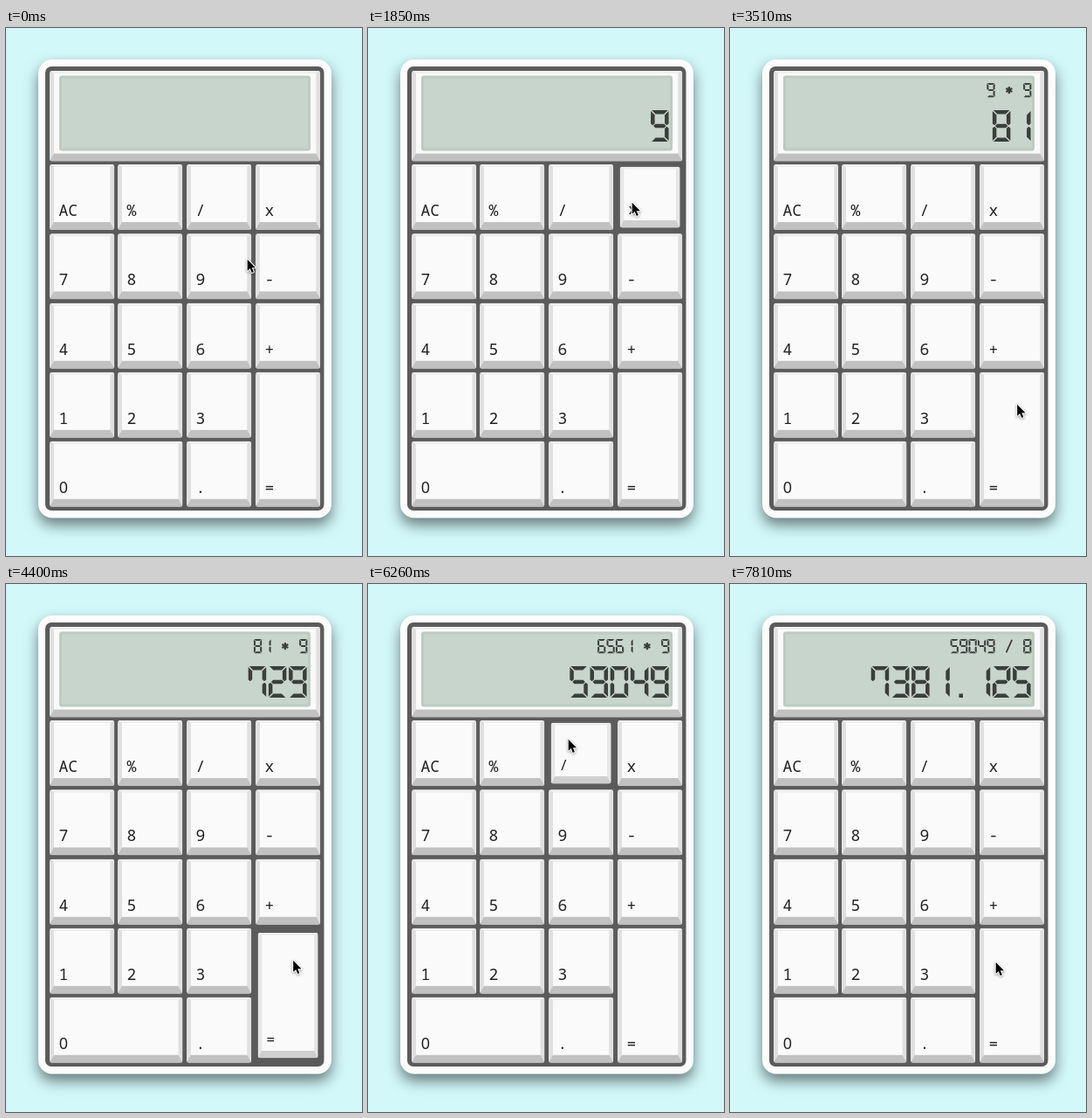
Animation, 408 px wide and 604 px high, one loop 8 s. Source, as an HTML page with a canvas:

```html
<!DOCTYPE html>
<html lang="en">
<head>
<meta charset="utf-8">
<title>Calculator</title>
<style>
  html, body { margin: 0; width: 100%; height: 100%; overflow: hidden; background: #d2f8fa; }
  canvas { display: block; width: 408px; height: 604px; }
</style>
</head>
<body>
<canvas id="stage"></canvas>
<script>
const W = 408, H = 604, LOOP = 8000;
const canvas = document.getElementById('stage');
const ctx = canvas.getContext('2d');
const dpr = window.devicePixelRatio || 1;
canvas.width = W * dpr;
canvas.height = H * dpr;

// Key grid
const COLS = [50, 128, 207, 286], ROWS = [156, 235.3, 314.7, 393.7, 472.7];
const KEY_W = 74.3, KEY_H = 75;
const keys = [];
['AC % / x', '7 8 9 -', '4 5 6 +', '1 2 3 ='].forEach((row, r) =>
  row.split(' ').forEach((label, c) =>
    keys.push({ label, x: COLS[c], y: ROWS[r], w: KEY_W, h: label === '=' ? 154 : KEY_H })));
keys.push({ label: '0', x: COLS[0], y: ROWS[4], w: 152.5, h: KEY_H });
keys.push({ label: '.', x: COLS[2], y: ROWS[4], w: KEY_W, h: KEY_H });

// Key presses: label, down, up
const presses = [
  ['9', 890, 1060], ['x', 1850, 2020], ['=', 2980, 3070], ['=', 3870, 3950],
  ['=', 4400, 4580], ['=', 5020, 5110], ['/', 6170, 6340], ['8', 6870, 7040],
  ['=', 7635, 7810]
];

// Display contents: time, expression, value
const readings = [
  [0, '', ''], [1240, '', '9'], [2020, '9 *', '9'], [3070, '9 * 9', '81'],
  [3950, '81 * 9', '729'], [4580, '729 * 9', '6561'], [5110, '6561 * 9', '59049'],
  [6340, '59049 /', '59049'], [7040, '59049 /', '8'], [7810, '59049 / 8', '7381.125']
];

// Pointer moves: first step, last step, number of steps, end point, bend point
const START = [276, 264];
const moves = [
  { t0: 270, t1: 440, n: 3, to: [261, 265], via: [268, 264] },
  { t0: 1240, t1: 1670, n: 6, to: [302, 199], via: [278, 225] },
  { t0: 2020, t1: 2370, n: 5, to: [239, 276], via: [272, 240] },
  { t0: 2550, t1: 2890, n: 5, to: [332, 429.5], via: [285, 370] },
  { t0: 3420, t1: 3510, n: 2, to: [328.5, 430], via: [330, 430] },
  { t0: 5290, t1: 5810, n: 7, to: [229, 177], via: [300, 220] },
  { t0: 6430, t1: 6610, n: 3, to: [150, 310], via: [185, 270] },
  { t0: 6690, t1: 6870, n: 3, to: [141, 282], via: [142, 300] },
  { t0: 7125, t1: 7470, n: 5, to: [304, 432], via: [225, 375] }
];

function pointerAt(t) {
  let from = START;
  for (const m of moves) {
    if (t < m.t0) break;
    const step = Math.min(m.n, 1 + Math.floor((t - m.t0 + 2) / ((m.t1 - m.t0) / (m.n - 1))));
    const e = 1 - (1 - step / m.n) ** 2, u = 1 - e;
    if (step < m.n) {
      return from.map((a, i) => u * u * a + 2 * u * e * m.via[i] + e * e * m.to[i]);
    }
    from = m.to;
  }
  return from;
}

function poly(points, color) {
  ctx.beginPath();
  points.forEach(([x, y]) => ctx.lineTo(x, y));
  ctx.closePath();
  ctx.fillStyle = color;
  ctx.fill();
}

function box(x, y, w, h, r, color) {
  ctx.beginPath();
  ctx.roundRect(x, y, w, h, r);
  ctx.fillStyle = color;
  ctx.fill();
}

function bevel(x, y, w, h, side, bottom) {
  const r = x + w, b = y + h, s = 5, top = 3, foot = 9;
  ctx.save();
  ctx.beginPath();
  ctx.roundRect(x, y, w, h, 3);
  ctx.clip();
  ctx.fillStyle = side;
  ctx.fillRect(x, y, w, h);
  poly([[x, y], [r, y], [r - s, y + top], [x + s, y + top]], '#efefef');
  poly([[x, b], [r, b], [r - s, b - foot], [x + s, b - foot]], bottom);
  ctx.fillStyle = '#fafafa';
  ctx.fillRect(x + s, y + top, w - 2 * s, h - top - foot);
  ctx.restore();
}

function drawKey({ label, x, y, w, h }, down) {
  ctx.save();
  if (down) {
    const cx = x + w / 2, cy = y + h / 2;
    ctx.translate(cx, cy);
    ctx.scale(0.93, 0.93);
    ctx.translate(-cx, -cy);
  }
  bevel(x, y, w, h, down ? '#e6e6e6' : '#e0e0e0', down ? '#cfcfcf' : '#c1c1c1');
  ctx.fillStyle = '#222';
  const plainZero = label === '0';
  ctx.font = plainZero ? '18px "Noto Sans", sans-serif' : '18px "Noto Sans Mono", monospace';
  ctx.fillText(label, x + (plainZero ? 10.8 : 10.5), y + h - 16.2);
  ctx.restore();
}

// Seven-segment glyphs, in units of the large digits
const GW = 20.5, GH = 36, CELL = 23.2, T = 4.5, MID = GH / 2;
const INK = '#3a3f3b';
const flipX = p => p.map(([x, y]) => [GW - x, y]);
const flipY = p => p.map(([x, y]) => [x, GH - y]);
const bar = [[1, 0], [GW - 1, 0], [GW - 1 - T, T], [1 + T, T]];
const post = [[0, 1], [T, 1 + T], [T, MID - 3], [T / 2, MID - 0.7], [0, MID - 2.5]];
const segments = {
  a: bar, d: flipY(bar),
  f: post, b: flipX(post), e: flipY(post), c: flipX(flipY(post)),
  g: [[3, MID], [5.2, MID - 2.2], [GW - 5.2, MID - 2.2],
      [GW - 3, MID], [GW - 5.2, MID + 2.2], [5.2, MID + 2.2]]
};
const digits = ['abcdef', 'bc', 'abged', 'abgcd', 'fgbc', 'afgcd', 'afgecd', 'fabc', 'abcdefg', 'abcdfg'];

function line(x1, y1, x2, y2, width) {
  ctx.beginPath();
  ctx.moveTo(x1, y1);
  ctx.lineTo(x2, y2);
  ctx.lineWidth = width;
  ctx.strokeStyle = INK;
  ctx.stroke();
}

function drawGlyph(ch) {
  if (ch === '.') {
    box(GW / 2 - 2.3, GH - T, T, T, 0, INK);
  } else if (ch === '/') {
    line(3, GH - 2, GW - 3, 2, 4);
  } else if (ch === '*') {
    for (let i = 0; i < 3; i++) {
      const a = Math.PI * (i / 3 + 0.5), dx = 9 * Math.cos(a), dy = 9 * Math.sin(a);
      line(GW / 2 - dx, MID - dy, GW / 2 + dx, MID + dy, 5);
    }
  } else if (ch !== ' ') {
    for (const s of digits[ch]) poly(segments[s], INK);
  }
}

function drawReadout(text, y, scale) {
  [...text].forEach((ch, i) => {
    ctx.save();
    ctx.translate(346 - (text.length - i) * CELL * scale, y);
    ctx.scale(scale, scale);
    ctx.translate(1.3, 0);
    drawGlyph(ch);
    ctx.restore();
  });
}

function drawCase() {
  ctx.fillStyle = '#d2f8fa';
  ctx.fillRect(0, 0, W, H);
  ctx.save();
  ctx.shadowColor = 'rgba(0,0,0,0.5)';
  ctx.shadowBlur = 16 * dpr;
  ctx.shadowOffsetY = 8 * dpr;
  box(37, 36, 336, 524.5, 16, '#fcfcfc');
  ctx.restore();
  box(45, 44, 319.5, 508, 7, '#5b5b5b');
  bevel(50, 49, 310.3, 103.5, '#e0e0e0', '#c1c1c1');
  box(61, 54.5, 288, 86, 3, '#bdcbc1');
  box(64, 57.5, 282, 80, 1, '#c8d5cc');
}

function drawPointer([x, y]) {
  ctx.save();
  ctx.translate(x + 0.7, y + 0.7);
  ctx.beginPath();
  [[0, 0], [0, 13], [3, 10.3], [5.1, 15.2], [7.2, 14.3], [5.1, 9.5], [9.3, 9.5]]
    .forEach(([px, py]) => ctx.lineTo(px, py));
  ctx.closePath();
  ctx.lineJoin = 'round';
  ctx.lineWidth = 2;
  ctx.strokeStyle = '#fff';
  ctx.shadowColor = 'rgba(0,0,0,0.4)';
  ctx.shadowBlur = 3 * dpr;
  ctx.shadowOffsetY = dpr;
  ctx.stroke();
  ctx.shadowColor = 'transparent';
  ctx.fillStyle = '#000';
  ctx.fill();
  ctx.restore();
}

function draw(t) {
  ctx.setTransform(dpr, 0, 0, dpr, 0, 0);
  drawCase();
  for (const key of keys) {
    drawKey(key, presses.some(([label, down, up]) => label === key.label && t >= down && t < up));
  }
  const [, expression, value] = readings.filter(r => t >= r[0]).pop();
  drawReadout(expression, 63, 0.45);
  drawReadout(value, 94, 1);
  drawPointer(pointerAt(t));
}

const begin = performance.now();
function tick() {
  draw((performance.now() - begin) % LOOP);
  requestAnimationFrame(tick);
}
tick();
</script>
</body>
</html>
```
